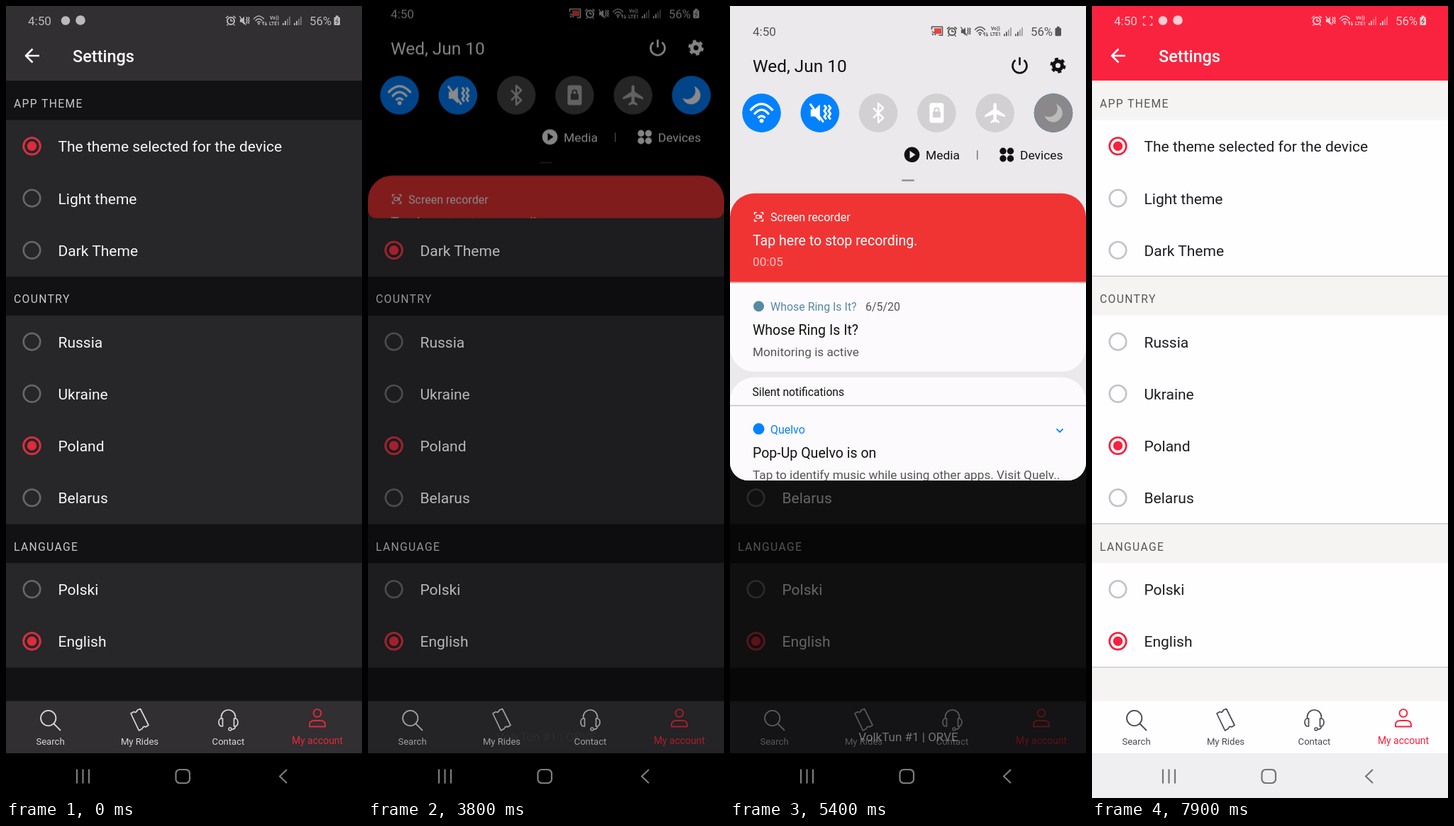
Write an HTML page that moves like this. It is 502 px wide and 1115 px high and loops after 8000 ms.

```html
<!DOCTYPE html>
<html lang="en">
<head>
<meta charset="utf-8">
<title>Theme settings</title>
<style>
html, body { margin: 0; width: 100%; height: 100%; overflow: hidden; background: #000; }
svg { display: block; width: 100%; height: 100%; font-family: Roboto, sans-serif; }
text { white-space: pre; }
</style>
</head>
<body>
<svg id="stage" viewBox="0 0 502 1115"></svg>
<script>
const LOOP = 8000;
const stage = document.getElementById('stage');

// Markup helpers
const box = (x, y, w, h, fill, r = 0) =>
  `<rect x="${x}" y="${y}" width="${w}" height="${h}" rx="${r}" fill="${fill}"/>`;
const dot = (x, y, r, fill, extra = '') => `<circle cx="${x}" cy="${y}" r="${r}" fill="${fill}" ${extra}/>`;
const ring = (x, y, r, color, w, extra = '') =>
  `<circle cx="${x}" cy="${y}" r="${r}" fill="none" stroke="${color}" stroke-width="${w}" ${extra}/>`;
const shape = (d, fill) => `<path d="${d}" fill="${fill}"/>`;
const line = (d, color, w) =>
  `<path d="${d}" fill="none" stroke="${color}" stroke-width="${w}" stroke-linejoin="round"/>`;
const text = (x, y, s, size, fill, extra = '') =>
  `<text x="${x}" y="${y}" font-size="${size}" fill="${fill}" ${extra}>${s}</text>`;
const at = (x, y, body, scale = 1) => `<g transform="translate(${x} ${y}) scale(${scale})">${body}</g>`;
const centered = 'text-anchor="middle"';
const bold = 'font-weight="700"';

const appThemes = {
  dark: { header: '#312f32', page: '#121114', card: '#272629', nav: '#312f32', system: '#000',
    title: '#fafafa', text: '#f7f6f8', label: '#c9c8ca', icon: '#d8d7d9', status: '#bab9bb',
    ring: '#666568', red: '#df2b3b', buttons: '#7d7c7e', edge: '#272629' },
  light: { header: '#fa233f', page: '#f6f4f2', card: '#fefdff', nav: '#fefdff', system: '#efeef1',
    title: '#fff', text: '#1d1c1e', label: '#575557', icon: '#4a484b', status: '#ffccd2',
    ring: '#c5c3c6', red: '#f5233d', buttons: '#767578', edge: '#cbc9ca' }
};
const shadeThemes = {
  dark: { bg: '#000', card: '#262528', text: '#f5f5f5', sub: '#bcbbbd', app: '#82a3b8', off: '#464547',
    offIcon: '#b8b7b9', status: '#c4c3c5', clear: '#4d4c4e', moonIcon: '#fff', chevron: '#8db4cc',
    rule: '#080809', handle: '#29282a', timer: '00:04', bottom: 885, lift: 0 },
  light: { bg: '#ebe9eb', card: '#fcfafc', text: '#111', sub: '#555', app: '#5789a5', off: '#d2d0d2',
    offIcon: '#fff', status: '#555', clear: '#aaa', moonIcon: '#bbb', chevron: '#3f87b5',
    rule: '#c8c6c8', handle: '#939193', timer: '00:05', bottom: 879, lift: 4 }
};

const sections = [
  ['APP THEME', ['The theme selected for the device', 'Light theme', 'Dark Theme']],
  ['COUNTRY', ['Russia', 'Ukraine', 'Poland', 'Belarus']],
  ['LANGUAGE', ['Polski', 'English']]
];

// Glyphs drawn around the origin
const wifi = c => line('M-16-3.500Q0-22 16-3.500M-10.500 2Q0-11 10.500 2M-5 7Q0 1.500 5 7', c, 3.2) + dot(0, 11, 2.9, c);
const mute = c => shape('M-13-5h6l7-7v24l-7-7h-6z', c) +
  line('M-14-13L5 13M6-11l3 4-3 4 3 4-3 4 3 4M12-11l3 4-3 4 3 4-3 4 3 4', c, 2.9);
const bluetooth = c => line('M-7-7L7 7 0 13.500V-13.500L7-7-7 7', c, 2.6);
const lock = (c, back) => box(-10, -14, 20, 28, c, 3) + box(-5.5, -2, 11, 8.5, back, 1) +
  line('M-3-2v-2a3 3 0 0 1 6 0v2', back, 2);
const plane = c => shape('M0-14c2 0 2.2 2 2.2 4v5l12 8v3l-12-4v7l4 3v2.5L0 12.5l-6.2 2V12l4-3V2l-12 4V3l12-8v-5c0-2 .2-4 2.2-4z', c);
const moon = c => shape('M4-12.5A13 13 0 1 1-12.5 4 12 12 0 0 0 4-12.5z', c);
const brackets = c => line('M-6-3v-3h3M3-6h3v3M6 3v3h-3M-3 6h-3v-3', c, 1.4);
const camera = c => line('M-3.5-2.2h5v4.4h-5zM1.5 0l2.5-2v4z', c, 1.2);

function statusIcons(c) {
  const bars = x => [3, 6, 9, 12].map((h, i) =>
    `<g opacity="${i < 2 ? 1 : .5}">${box(x + i * 3, 27 - h, 1.8, h, c)}</g>`).join('');
  return ring(317, 21, 5, c, 2) + line('M317 18v3h3M310 17l3.5-3M324 17l-3.5-3M313 26l-1.5 1.5M321 26l1.5 1.5', c, 1.6) +
    at(336, 20.5, mute(c), .47) + at(356.5, 20, wifi(c), .46) + line('M363 27v-5l-2 2M366 22v5l2-2', c, 1.1) +
    text(378.5, 19, 'Vo))', 6.8, c, centered + ' ' + bold) +
    text(378.5, 27, 'LTE1', 6.8, c, centered + ' ' + bold) +
    bars(390) + bars(406) + text(428, 27, '56%', 16.8, c) +
    box(462.5, 15.5, 8.5, 11.5, c, 1.5) + box(465, 13.5, 3.5, 2.5, c) +
    line('M468 17.5l-3 4h3.5l-3 4', '#555', 1.2);
}

function app(T) {
  let out = box(0, 0, 502, 1052, T.page) + box(0, 0, 502, 105, T.header) + box(0, 1052, 502, 63, T.system);
  out += text(31, 27, '4:50', 17.1, T.status) + statusIcons(T.status) +
    `<g class="recording">${at(78.5, 21, brackets(T.status) + `<g class="blink">${camera(T.status)}</g>`)}</g>` +
    `<g class="tray">${dot(84, 20.5, 6.3, T.status)}${dot(105, 20, 6.8, T.status)}</g>`;
  out += line('M47 70H28M37.5 60.5L28 70l9.5 9.5', T.title, 2.6) +
    text(94, 79, 'Settings', 23.5, T.title, 'font-weight="500"');

  let y = 105;
  for (const [label, rows] of sections) {
    const top = y + 55.5, height = rows.length * 73.25;
    out += text(11, y + 38, label, 15.7, T.label, 'letter-spacing="1.35"') + box(0, top, 502, height, T.card);
    out += box(0, top + height - .6, 502, 1.4, T.edge);
    rows.forEach((name, i) => {
      const cy = top + 36.8 + i * 73.25;
      out += ring(36.5, cy, 11.8, T.ring, 2.6) + text(73.5, cy + 8, name, 21, T.text) +
        `<g class="mark" data-name="${name}">${ring(36.5, cy, 11.8, T.red, 2.6)}${dot(36.5, cy, 6.7, T.red)}</g>`;
    });
    y = top + height;
  }

  out += box(0, 978.5, 502, 73.5, T.nav);
  out += ring(59.7, 1002.6, 10.7, T.icon, 1.8) + line('M67.5 1010.5l9.5 9.5', T.icon, 1.8);
  out += line('M176 996l4.5-2.5q2.5 2.5 5-2.5l4-1.5 11.5 23-4 2.5q-3-2-5 2.5l-4.5 2.5z', T.icon, 1.7);
  out += line('M303.5 1004v-3a10 10 0 0 1 20 0v3M305.5 1003v11h-1.5a4 5.5 0 0 1 0-11zM321.5 1003v11h1.5a4 5.5 0 0 0 0-11zM323.5 1014q0 4-5 4.5', T.icon, 1.7) +
    ring(316, 1018, 2, T.icon, 1.5);
  out += ring(439, 995.5, 5.4, T.red, 1.9) + line('M428 1014.5v-2.5q0-6 7-6h8q7 0 7 6v2.5z', T.red, 1.9);
  [['Search', 62.5], ['My Rides', 188.5], ['Contact', 313.5]].forEach(([s, x]) =>
    out += text(x, 1039.5, s, 13.1, T.icon, centered));
  out += text(439, 1038.8, 'My account', 13.9, T.red, centered);
  return out;
}

const systemButtons = c => line('M100 1074.5v20M108.5 1074.5v20M117 1074.5v20M396 1075l-10 9.5 10 9.5', c, 2.2) +
  `<rect x="239.5" y="1075" width="19.5" height="19" rx="5.5" fill="none" stroke="${c}" stroke-width="2.2"/>`;

function shade(T) {
  const blue = '#0381fe', red = '#f03434';
  const heading = 19.55, body = 17.2, small = 15.95;
  const chevron = (y, color = T.chevron) => line(`M460.5 ${y - 2}l4.5 4.5 4.5-4.5`, color, 1.8);
  const moonTile = dot(0, 0, 27.3, '#8a888b', 'class="moonOff"') + moon(T.moonIcon);
  const tiles = [[blue, wifi('#fff')], [blue, mute('#fff')], [T.off, bluetooth(T.offIcon)],
    [T.off, lock(T.offIcon, T.off)], [T.off, plane(T.offIcon)], [blue, moonTile]];
  let out = text(32, 57, '4:50', 17.1, T.status) + at(-4, 30, statusIcons(T.status)) +
    line('M284.5 48v-4h15v12h-5M284.5 51a5 5 0 0 1 5 5M284.5 54a2 2 0 0 1 2 2', T.status, 1.6) + box(288, 46, 10, 8, '#e5453f') +
    text(32, 108, 'Wed, Jun 10', 24.4, T.text);
  out += line('M402.5 91a10 10 0 1 0 12 0M408.5 87v11', T.text, 2.6) +
    ring(462.5, 98.5, 6, T.text, 5) + ring(462.5, 98.5, 9.2, T.text, 3.5, 'stroke-dasharray="4.817"');
  tiles.forEach(([fill, glyph], i) => out += at(44.5 + i * 82.3, 165.3, dot(0, 0, 27.3, fill) + glyph));
  out += dot(256.5, 224, 10.8, T.text) + shape('M253.5 218.5v11l8-5.5z', T.bg) + text(276, 230.5, 'Media', 17.4, T.text) +
    box(348, 218, 1.5, 13, '#777') + text(409, 230.5, 'Devices', 17.4, T.text);
  for (const x of [385, 395.5]) for (const y of [219, 229.5]) out += dot(x, y, 4.7, T.text);
  out += box(242, 259, 18, 2.4, T.handle, 1.2);

  out += box(0, 278.5, 502, 251, T.card, 34) + shape('M0 403.5V312.5a34 34 0 0 1 34-34h434a34 34 0 0 1 34 34V403.5z', red) +
    box(0, 403.5, 502, 1.6, T.rule) +
    at(40.5, 311.5, brackets('#fff') + camera('#fff')) + text(57, 317.5, 'Screen recorder', 16.05, '#fff') +
    text(32, 351.5, 'Tap here to stop recording.', heading, '#fff') + text(32, 381, T.timer, body, '#fbc0c0');
  out += dot(40.5, 437.5, 7.5, T.app) + text(57, 443.5, 'Whose Ring Is It?', small, T.app) + text(191, 443.5, '6/5/20', small, T.sub) +
    text(32, 477.5, 'Whose Ring Is It?', heading, T.text) + text(32, 507.5, 'Monitoring is active', body, T.sub);

  out += box(0, 537.5, 502, 282, T.card, 34);
  for (const y of [576.5, 702.8, 762.3]) out += box(0, y, 502, 1.6, T.rule);
  out += text(31.5, 563.3, 'Silent notifications', 15.7, T.text) +
    dot(40.5, 610, 8, blue) + text(57, 616.5, 'Quelvo', small, blue) + chevron(612, blue) +
    text(32, 651, 'Pop-Up Quelvo is on', heading, T.text) +
    text(32, 680.5, 'Tap to identify music while using other apps. Visit Quelv..', body, T.sub) +
    dot(40.5, 733, 7.8, T.app) + text(57, 739.5, 'Orbumin System', small, T.app) +
    text(182, 739.5, 'USB for file transfer', small, T.text) + chevron(735);
  out += at(0, -T.lift, shape('M39 783h6l-2 6h4l-9 11 2-8h-4z', T.app) + text(57, 797.5, 'Settings', small, T.app) +
    text(128, 797.5, 'Cable charging (4 h 10 m until fully charg…', small, T.text) + chevron(793) +
    text(221, 858.5, 'Notification settings', 16.9, T.text, bold) + text(423, 858.5, 'Clear', 16.9, T.clear, bold));
  return box(0, -40, 502, T.bottom + 40, T.bg, 34) + `<g class="content">${out}</g>`;
}

const toolbar = '<rect x="281.5" y="34.5" width="207.5" height="62.5" rx="31" fill="none" stroke="#fff"/>' +
  line('M305.5 57.5l9 8.5-9 8.5', '#fff', 2) +
  shape('M338.5 76l2-7 12-12 5 5-12 12zM354 55.5l2-1.5 4 4-1.5 2z', '#fff') +
  dot(402, 59.5, 5.5, '#fff') + shape('M392.5 77v-5q0-6 6-6h7q6 0 6 6v5z', '#fff') +
  ring(456.5, 66, 22, '#fff', 1.2) + box(448, 57.5, 17, 17, '#fff', 1);

stage.innerHTML = `
  <clipPath id="panel"><rect id="panelBox" x="0" y="-80" width="502"/></clipPath>
  <g>${app(appThemes.dark)}${systemButtons(appThemes.dark.buttons)}</g>
  <g id="lightApp">${app(appThemes.light)}${systemButtons(appThemes.light.buttons)}</g>
  <rect id="scrim" width="502" height="1052"/>
  <g id="shade" clip-path="url(#panel)">
    <g id="darkShade">${shade(shadeThemes.dark)}</g>
    <g id="lightShade">${shade(shadeThemes.light)}</g>
  </g>
  <g id="carrier">${text(251.5, 1034.5, 'VolkTun #1 | ORVE', 17, '#f0f0f0', centered)}</g>
  <g id="toolbar">${toolbar}</g>`;

const get = id => document.getElementById(id);
const all = name => [...stage.querySelectorAll('.' + name)];
const marks = all('mark'), trays = all('tray'), recordings = all('recording'), blinks = all('blink');
const contents = all('content'), moonOffs = all('moonOff');
const fade = (el, value) => el.setAttribute('opacity', value);
const clamp = v => Math.max(0, Math.min(1, v));
const ramp = (t, from, to) => clamp((t - from) / (to - from));
const smooth = u => u * u * (3 - 2 * u);

function draw(t) {
  // Each tap changes the theme first, then its radio mark
  const taps = [1150, 2350, 7550];
  const [a, b, c] = taps.map(s => ramp(t, s + 130, s + 330));
  const [la, lb, lc] = taps.map(s => ramp(t, s, s + 200));
  fade(get('lightApp'), la - lb + lc);

  const selected = { 'The theme selected for the device': 1 - a + c, 'Light theme': a - b, 'Dark Theme': b - c, Poland: 1, English: 1 };
  for (const mark of marks) {
    const amount = selected[mark.dataset.name] || 0;
    fade(mark, amount);
    mark.lastChild.setAttribute('r', 6.7 * amount);
  }

  const recording = ramp(t, 50, 300);
  const beat = Math.floor((t < 4500 ? t : t - 5700) / 500);
  trays.forEach(el => el.setAttribute('transform', `translate(${16 * recording} 0)`));
  recordings.forEach(el => fade(el, recording));
  blinks.forEach(el => fade(el, beat % 2 === 1 ? 1 : 0));

  const open = t < 5350 ? smooth(ramp(t, 3450, 4350)) : (1 - ramp(t, 5350, 5920)) ** 3;
  const bright = ramp(t, 5120, 5320);
  get('panelBox').setAttribute('height', 80 + 885 * open);
  get('panelBox').setAttribute('rx', 34 * open);
  fade(get('shade'), open > 0 ? clamp(.6 + 2 * open) : 0);
  fade(get('darkShade'), bright < 1 ? 1 : 0);
  fade(get('lightShade'), bright);
  fade(get('scrim'), .78 * open);
  fade(get('carrier'), open ** 3);
  fade(get('toolbar'), .5 * clamp(1 - Math.abs(t - 5220) / 100));
  moonOffs.forEach(el => fade(el, ramp(t, 5000, 5350)));
  contents.forEach(el => {
    el.setAttribute('transform', `translate(0 ${-60 * (1 - open)})`);
    fade(el, clamp(open * 1.6));
  });
}

const start = performance.now();
function tick() {
  draw((performance.now() - start) % LOOP);
  requestAnimationFrame(tick);
}
tick();
</script>
</body>
</html>
```
